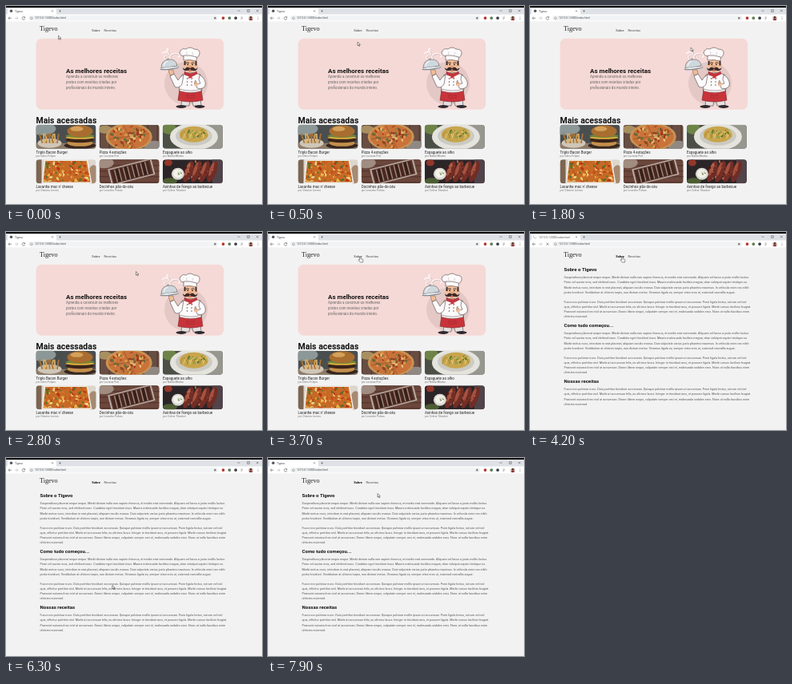
Recreate the animation shown at these times as an HTML page with a canvas. Size 320 px wide and 248 px high, loop 8000 ms.

```html
<!DOCTYPE html>
<html lang="pt">
<head>
<meta charset="utf-8">
<title>Tigevo</title>
<style>
  html, body { margin: 0; width: 100%; height: 100%; overflow: hidden; background: #f2f2f2; }
  canvas { display: block; width: 320px; height: 248px; }
</style>
</head>
<body>
<canvas id="stage"></canvas>
<script>
const W = 320, H = 248, LOOP = 8000, STEP = 100;
const PAGE_SWITCH = 4000, PAGE_LOADED = 4400;
const BRAND = 'Tigevo';
const SANS = 'Roboto, "Open Sans", sans-serif';
const SERIF = '"Liberation Serif", "Noto Serif", serif';

const canvas = document.getElementById('stage');
const ctx = canvas.getContext('2d');
const ratio = window.devicePixelRatio || 1;
canvas.width = W * ratio;
canvas.height = H * ratio;
ctx.scale(ratio, ratio);

// ---------- drawing helpers ----------
function rect(x, y, w, h, color) {
  ctx.fillStyle = color;
  ctx.fillRect(x, y, w, h);
}

function oval(x, y, rx, ry, color, turn = 0) {
  ctx.beginPath();
  ctx.ellipse(x, y, rx, ry, turn, 0, Math.PI * 2);
  ctx.fillStyle = color;
  ctx.fill();
}

function shape(d, fill, stroke, width = 0.5) {
  const path = new Path2D(d);
  if (fill) {
    ctx.fillStyle = fill;
    ctx.fill(path);
  }
  if (stroke) {
    ctx.strokeStyle = stroke;
    ctx.lineWidth = width;
    ctx.stroke(path);
  }
}

function rounded(x, y, w, h, r) {
  ctx.beginPath();
  ctx.roundRect(x, y, w, h, r);
}

// Lays text out at ten times its size so that small type keeps exact spacing.
function text(s, x, y, size, color, weight = 400, family = SANS) {
  ctx.save();
  ctx.translate(x, y);
  ctx.scale(0.1, 0.1);
  ctx.font = `${weight} ${size * 10}px ${family}`;
  ctx.fillStyle = color;
  ctx.fillText(s, 0, 0);
  ctx.restore();
}

function random(seed) {
  return () => (seed = (seed * 16807) % 2147483647) / 2147483647;
}

// Scatters small ovals over an elliptical area.
function specks(count, colors, x, y, rx, ry, size, seed) {
  const rnd = random(seed);
  for (let i = 0; i < count; i++) {
    const a = rnd() * Math.PI * 2, d = Math.sqrt(rnd());
    const r = size * (0.5 + rnd());
    oval(x + Math.cos(a) * d * rx, y + Math.sin(a) * d * ry, r, r * 0.6, colors[i % colors.length], rnd() * 3);
  }
}

// ---------- browser frame ----------
function drawBrowser(about, loading) {
  rect(0, 0, W, 20, '#fff');
  rect(0, 2, W, 8.5, '#dee1e6');
  rect(0, 0, W, 2, '#0b0b0b');
  rounded(2, 3, 61, 9, [2, 2, 0, 0]);
  ctx.fillStyle = '#fff';
  ctx.fill();

  const address = '127.0.0.1:5500/' + (about ? 'sobre.html' : 'index.html');
  if (loading) {
    shape('M5 4.7 a1.8 1.8 0 1 0 3 1.6', null, '#8a8f96', 0.6);
    text(address, 11, 7.7, 3.3, '#555');
  } else {
    oval(6.5, 6.3, 1.8, 1.8, '#55595e');
    text(BRAND, 11, 7.7, 3.4, '#444');
  }
  shape('M57 5.3 l2 2 m0 -2 l-2 2 M66 6.3 h3 m-1.5 -1.5 v3', null, '#555');
  shape('M289.5 6 h3 M301.7 4.7 h2.6 v2.6 h-2.6z M313 4.7 l2.6 2.6 m0 -2.6 l-2.6 2.6', null, '#333', 0.45);

  shape('M7 15.2 h-4 l1.8 -1.8 m-1.8 1.8 l1.8 1.8', null, '#555', 0.6);
  shape('M11 15.2 h4 l-1.8 -1.8 m1.8 1.8 l-1.8 1.8', null, '#b5b5b5', 0.6);
  if (loading) shape('M20.5 13.7 l3 3 m0 -3 l-3 3', null, '#555', 0.6);
  else shape('M23.4 14.2 a1.8 1.8 0 1 0 .3 1.6 m0 -2.6 v1.4 h-1.4', null, '#555', 0.6);

  rounded(28, 11.8, 237.5, 6.6, 3.3);
  ctx.fillStyle = '#f1f3f4';
  ctx.fill();
  shape('M30.4 15.2 a1.5 1.5 0 1 0 3 0 a1.5 1.5 0 1 0 -3 0 M31.9 15 v.9', null, '#666', 0.4);
  text(address, 36, 16.4, 3.3, '#444');
  shape('M261.3 13.3 l.5 1.2 1.3 .1 -1 .8 .4 1.3 -1.2 -.7 -1.2 .7 .4 -1.3 -1 -.8 1.3 -.1z', '#666');
  ['#b8352f', '#5f7a50', '#3b4048'].forEach((c, i) => oval(271.5 + i * 7.8, 15.1, 1.9, 1.9, c));
  shape('M293.5 14 h2.6 M293.5 15.2 h2.6 M293.5 16.4 h1.6', null, '#777');

  ctx.save();
  ctx.beginPath();
  ctx.arc(306, 15.2, 2.8, 0, Math.PI * 2);
  ctx.clip();
  rect(303, 12, 6, 7, '#c9b3aa');
  oval(306, 14.3, 1.3, 1.6, '#5a3a33');
  oval(306, 18.2, 2.8, 2.2, '#8f2f30');
  ctx.restore();
  for (const y of [13.6, 15.2, 16.8]) oval(315, y, 0.45, 0.45, '#555');

  rect(0, 19.3, W, H, '#f2f2f2');
}

function drawHeader(about) {
  text(BRAND, 42, 31, 8.1, '#222', 400, SERIF);
  text('Sobre', 107.3, 32.3, 4.05, about ? '#111' : '#333', about ? 700 : 400);
  text('Receitas', 122.5, 32.3, 4.05, '#444');
}

// ---------- home page ----------
function drawChef() {
  const line = '#4f4244', white = '#fcfafa', skin = '#f1bd98', red = '#c9333a', hair = '#3b2926';
  oval(225, 97, 27, 27, '#e3c8c5');

  // steam
  shape('M201 68 q-6 -4 -1 -6 q6 0 2 -5 q-3 -3 1 -4 M206 66 q-3 -4 2 -6 q5 -2 8 1 q2 3 -1 3 M195 60 q3 -4 6 -2',
    null, '#fff', 1.1);
  shape('M202 68 q-6 -4 -1 -6 q6 0 2 -5 M207 66 q-3 -4 2 -5 q5 -2 7 1', null, '#a99493', 0.4);

  // legs
  shape('M220 116 h10 l-1 9 h-10z M232 116 h11 l1 9 h-10z', '#e6e0e0', line, 0.6);
  oval(219, 126, 6.5, 1.9, '#2c2a30');
  oval(242, 126, 6.5, 1.9, '#2c2a30');

  // jacket, arms and apron
  shape('M220 86 q11 -5 23 0 q4 10 1 22 h-27 q-2 -12 3 -22z', white, line, 0.6);
  shape('M222 86 q-5 3 -7 7 l-5 -8 -5 3 6 13 q5 3 9 -3z', white, line, 0.6);
  shape('M242 86 q9 6 7 14 q-3 5 -10 3 l-1 -5 5 -1 -2 -5z', white, line, 0.6);
  oval(237.5, 98, 2.4, 2.8, skin);
  shape('M236 98 q-1 -4 1 -5 l1 4', skin, line, 0.4);
  shape('M217 105 q14 4 27 0 l2 13 q-16 4 -31 0z', red, '#7c2226', 0.6);
  shape('M217 104 q14 4 27 0 v2.6 q-13 4 -27 0z', '#f3eded', line, 0.4);
  shape('M226 111 q5 3 9 0 v4 h-9z', null, '#94252b');
  for (const y of [91, 95, 99]) {
    oval(226.5, y, 0.7, 0.7, line);
    oval(232, y, 0.7, 0.7, line);
  }

  // cloche
  shape('M203 80 h6 l1 5 -5 2z', skin, line, 0.4);
  shape('M194 78 q0 -10 9 -11 q10 -1 11 8z', '#cfd8dd', line);
  shape('M197 75 q1 -5 5 -6', null, '#fff', 1);
  oval(202.5, 66.5, 1.2, 1, '#8e989e');
  oval(204.5, 78, 12, 1.7, '#7f898f', -0.12);
  oval(204.5, 77.5, 11, 0.9, '#eef1f2', -0.12);

  // head
  shape('M223 82 q8 5 15 0 l1 3 -8 4 -8 -3z', red, '#7c2226', 0.4);
  shape('M230 87 l-3 4 4 -1 3 1z', red);
  oval(223, 74, 1.6, 2.2, skin);
  oval(238, 74.5, 1.6, 2.2, skin);
  oval(230.2, 74.5, 7.5, 9, skin);
  shape('M222.6 69 h2 v5 h-2z M236.5 69 h2 v5.5 h-2z', hair);
  shape('M225 71.5 q2 -1.5 4 0 M231.5 71.5 q2 -1.5 4 0', null, hair, 0.9);
  oval(227.3, 73.3, 0.8, 1, '#2b2020');
  oval(233, 73.3, 0.8, 1, '#2b2020');
  shape('M227 80.5 q3 2 6 0z', '#a82b2b');
  shape('M230 77.4 q-4 -2 -6 1 q-2 1 -3 -1.6 q0 5 5 4.2 q3 0 4 -2 q1 2 4 2 q5 1 5.5 -4.2 q-1.5 2.6 -3.5 1.6 q-2 -3 -6 -1z', hair);
  oval(230, 76, 2, 1.7, '#e49f7d');

  // hat
  shape('M222 63 q-7 -2 -4 -7 q3 -4 7 -2 q5 -4 10 0 q8 0 7 6 q-1 4 -4 5z', white, line, 0.6);
  shape('M222 62 q8 -1 16.5 2 l-.6 5 q-8 -2.5 -15.9 -1z', white, line, 0.6);
  shape('M226 61 q-1 -2 0 -4 M233 61.5 q1 -2 0 -4', null, '#b9abab');
}

// Each photo paints a 75 by 30 area from the origin.
const photos = {
  burger() {
    rect(0, 0, 75, 30, '#4b4e4e');
    oval(8, 5, 17, 8, '#8c9797');
    rect(0, 23, 75, 7, '#8f7b67');
    oval(17, 23, 15, 6, '#cfc6b8');
    for (let i = 0; i < 9; i++) {
      shape(`M${8 + i * 2.3} 23 l${i % 3 * 3 - 4} -12`, null, i % 2 ? '#d9ad62' : '#a87439', 1.8);
    }
    oval(55, 26, 20, 4, '#362720');
    oval(55, 23, 16, 4, '#c48f4c');
    oval(55, 19, 18, 3.4, '#3b241a');
    oval(55, 16, 18, 2, '#e0b040');
    oval(55, 14, 18, 2.2, '#71883a');
    oval(55, 8, 16, 7.5, '#a96d30');
    oval(51, 5, 8, 3, '#d3a15b');
  },
  pizza() {
    rect(0, 0, 75, 30, '#684d42');
    for (let i = 0; i < 75; i += 12) rect(i, 0, 1, 30, '#493730');
    oval(7, 6, 9, 5, '#a78f62');
    oval(68, 27, 12, 7, '#908983');
    oval(37, 15, 29, 17, '#c79456');
    oval(37, 15, 26, 15, '#c9733a');
    specks(65, ['#a5341f', '#e8c27a', '#8b4a25', '#d99a4c', '#66713a'], 37, 15, 25, 14, 2, 71);
    shape('M12 18 L62 11 M30 0 L45 30', null, '#8d542c', 0.7);
  },
  pasta() {
    rect(0, 0, 75, 30, '#4c4f45');
    rect(56, 0, 19, 30, '#979790');
    oval(8, 5, 9, 7, '#6d8347');
    oval(39, 15, 30, 17, '#e4e3dd');
    oval(39, 14, 23, 12, '#cbcac3');
    oval(39, 12, 18, 10, '#c8a54c');
    for (let i = 0; i < 8; i++) {
      shape(`M${22 + i * 4} 17 q4 -16 9 -2`, null, i % 2 ? '#eed786' : '#a17a2d', 0.7);
    }
    specks(20, ['#57752f', '#8fa14c'], 39, 10, 14, 7, 1.3, 29);
  },
  lasagna() {
    rect(0, 0, 75, 30, '#dcd6cd');
    rect(0, 0, 7, 30, '#7d6553');
    oval(72, 20, 7, 13, '#a68a72');
    shape('M11 1 h53 l5 28 h-61z', '#c66a25', '#f0ece4', 1.6);
    ctx.save();
    ctx.clip(new Path2D('M12 2 h51 l5 26 h-59z'));
    specks(150, ['#e9b548', '#b53319', '#d97a2c', '#5d6f2c', '#f0d083', '#c94a20'], 38, 15, 38, 18, 1.8, 413);
    ctx.restore();
  },
  sweets() {
    rect(0, 0, 75, 30, '#6b463b');
    for (let i = 0; i < 30; i += 7) rect(0, i, 75, 1, '#4d322b');
    oval(6, 4, 12, 7, '#a08c80');
    ctx.save();
    ctx.translate(40, 15);
    ctx.rotate(-0.25);
    rect(-28, -10, 56, 21, '#b9aaa2');
    rect(-26, -8.5, 52, 18, '#5a382f');
    for (let i = 0; i < 9; i++) rect(-24.5 + i * 5.6, -7.5, 3.6, 16, i % 2 ? '#36201b' : '#472821');
    for (let i = 0; i < 8; i++) rect(-20.6 + i * 5.6, -7.5, 1.2, 16, '#a98d80');
    ctx.restore();
  },
  wings() {
    rect(0, 0, 75, 30, '#2c2527');
    rect(62, 0, 13, 30, '#51434a');
    oval(7, 4, 5, 4, '#93372c');
    oval(9, 27, 9, 4, '#4d5d33');
    for (let i = 0; i < 4; i++) {
      oval(32 + i * 10, 15, 5, 14, '#702d25', 0.35);
      oval(31 + i * 10, 12, 2, 9, '#a55340', 0.35);
    }
    specks(40, ['#451a17', '#b8674b', '#853529'], 46, 15, 21, 13, 1.3, 57);
    oval(19, 18, 8, 7.5, '#d9d7d1');
    oval(19, 17.5, 6, 5.3, '#f3f1e9');
    specks(9, ['#7f9460'], 19, 17.5, 4.5, 4, 0.8, 19);
  }
};

const cards = [
  ['burger', 'Triplo Bacon Burger', 'Dário Felpes'],
  ['pizza', 'Pizza 4 estações', 'Luciana Prel'],
  ['pasta', 'Espaguete ao alho', 'Nádia Mirabo'],
  ['lasagna', "Lasanha mac n' cheese", 'Otavino Lemeu'],
  ['sweets', 'Docinhos pão-do-céu', 'Leandro Pulvas'],
  ['wings', 'Asinhas de frango ao barbecue', 'Celma Tibadori']
];

function drawCard([photo, title, author], i) {
  const x = 37.5 + (i % 3) * 79.2;
  const y = i < 3 ? 148.8 : 192.3;
  ctx.save();
  rounded(x, y, 75, 30, 4);
  ctx.clip();
  ctx.translate(x, y);
  photos[photo]();
  ctx.restore();
  text(title, x, y + 35.8, 4.5, '#222');
  text('por ' + author, x, y + 40.1, 3.4, '#777');
}

function drawHome() {
  rounded(37.5, 40.7, 234.7, 89, 7);
  ctx.fillStyle = '#f5d9d6';
  ctx.fill();
  text('As melhores receitas', 75, 84, 8, '#111', 700);
  ['Aprenda a construir os melhores', 'pratos com receitas criadas por', 'profissionais do mundo inteiro.']
    .forEach((s, i) => text(s, 75, 90.4 + i * 7, 4.5, '#666'));
  drawChef();
  text('Mais acessadas', 37.5, 147.3, 10.5, '#111', 700);
  cards.forEach(drawCard);
}

// ---------- about page ----------
const intro = [
  'Suspendisse placerat neque neque. Morbi dictum nulla non sapien rhoncus, et mattis erat commodo. Aliquam vel lacus a justo mollis luctus.',
  'Proin vel auctor eros, sed eleifend nunc. Curabitur eget tincidunt risus. Mauris malesuada facilisis magna, vitae volutpat sapien tristique eu.',
  'Morbi metus nunc, interdum in erat placerat, aliquam iaculis massa. Duis vulputate varius justo pharetra maximus. In vehicula enim nec nibh',
  'porta tincidunt. Vestibulum at ultrices turpis, non dictum metus. Vivamus ligula ex, semper vitae eros ut, euismod convallis augue.'
];
const closing = [
  'Fusce nec pulvinar nunc. Duis porttitor tincidunt accumsan. Quisque pulvinar mollis ipsum ut accumsan. Proin ligula lectus, rutrum vel nisl',
  'quis, efficitur porttitor nisl. Morbi at accumsan felis, eu ultrices lacus. Integer in tincidunt arcu, et posuere ligula. Morbi cursus facilisis feugiat.',
  'Praesent euismod nec nisl at accumsan. Donec libero neque, vulputate semper orci et, malesuada sodales eros. Nunc ut nulla faucibus enim',
  'ultricies euismod.'
];

function paragraph(lines, y) {
  lines.forEach((s, i) => text(s, 42.5, y + i * 6.1, 3.73, '#555'));
}

function drawAbout() {
  ['Sobre o ' + BRAND, 'Como tudo começou...', 'Nossas receitas'].forEach((title, i) => {
    const y = 49.3 + i * 70;
    text(title, 42.5, y, 6.05, '#111', 700);
    if (i < 2) {
      paragraph(intro, y + 9);
      paragraph(closing, y + 39.5);
    } else {
      paragraph(closing, y + 9);
    }
  });
}

// ---------- pointer ----------
const route = [
  [0, 65.5, 37], [500, 112, 45], [1100, 176, 51], [1800, 201, 52],
  [2300, 186, 57], [2700, 168, 53], [2800, 162.5, 49.5], [3600, 115, 31],
  [4500, 115, 31], [4800, 134, 62], [5100, 148, 112], [5400, 137, 147],
  [5700, 132, 166.5], [6200, 132, 166.5], [7100, 140, 103], [7900, 137, 44.5]
];

function pointerAt(t) {
  const next = route.findIndex(p => p[0] >= t);
  if (next <= 0) return route[0].slice(1);
  const [t0, x0, y0] = route[next - 1];
  const [t1, x1, y1] = route[next];
  const k = (t - t0) / (t1 - t0);
  return [x0 + (x1 - x0) * k, y0 + (y1 - y0) * k];
}

function drawPointer(t) {
  const [x, y] = pointerAt(t);
  const onLink = x > 107 && x < 118 && y > 28 && y < 35;
  ctx.save();
  ctx.translate(x, y);
  if (onLink) {
    shape('M0 0 q.9 -.4 1 .6 v2 l2.4 .7 q.6 .3 .5 1 l-.5 2.6 h-3.2 l-2 -2.6 q0 -1 1 -.5 l.4 .3 v-3.5z', '#fff', '#222', 0.5);
  } else {
    shape('M0 0 v4.6 l1.1 -1 .8 1.8 .8 -.4 -.8 -1.7 h1.5z', '#fff', '#222', 0.5);
  }
  ctx.restore();
}

// ---------- playback ----------
let shown = -1;

function render(t) {
  const about = t >= PAGE_SWITCH;
  drawBrowser(about, about && t < PAGE_LOADED);
  drawHeader(about);
  if (about) drawAbout();
  else drawHome();
  drawPointer(t);
}

function tick() {
  const t = Math.floor((performance.now() % LOOP) / STEP) * STEP;
  if (t !== shown) render(shown = t);
  requestAnimationFrame(tick);
}
tick();
</script>
</body>
</html>
```
